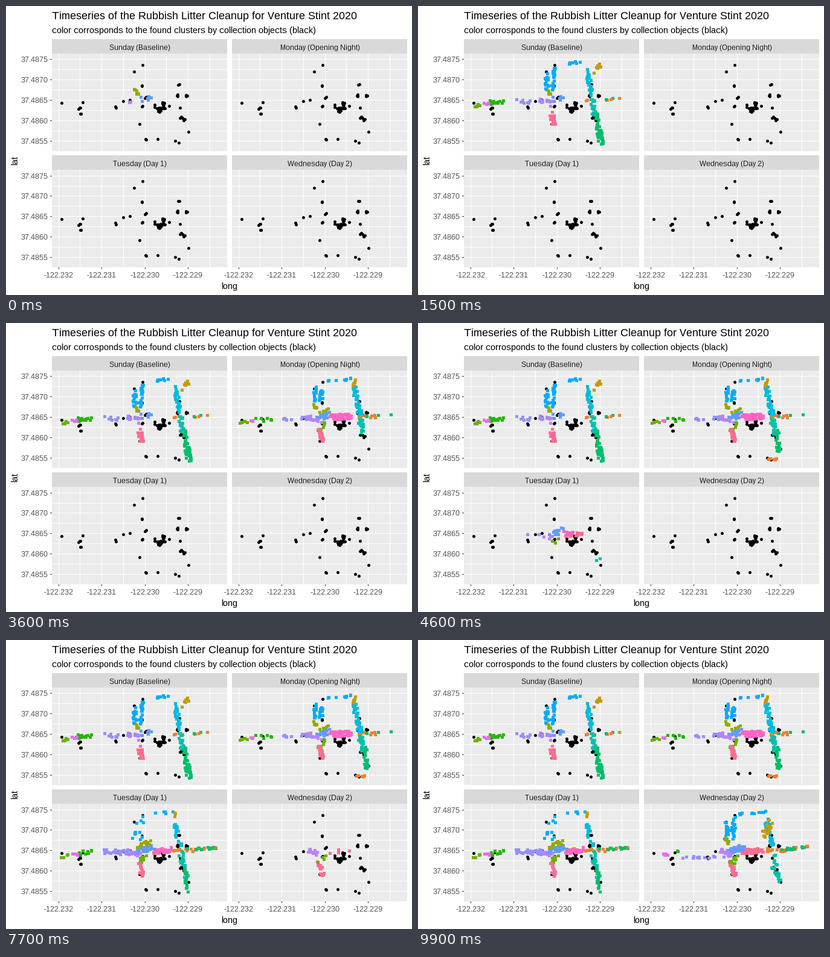
These frames come from a looping animation (672x480 px, 10 s). A matplotlib script:

```python
import numpy as np
import matplotlib.pyplot as plt
from matplotlib.animation import FuncAnimation
from matplotlib.patches import Rectangle

W, H, DPI = 672, 480, 96
FRAMES, STEP_MS = 100, 100
DX, DY = 298, 193.22  # distance between facets
PT = 72 / DPI

rng = np.random.default_rng(7)
# Whole-pixel glyph advances without kerning
plt.rcParams.update({"font.family": "Liberation Sans", "text.hinting": "native",
                     "text.hinting_factor": 1, "text.kerning_factor": 6})

fig = plt.figure(figsize=(W / DPI, H / DPI), dpi=DPI, facecolor="white")
ax = fig.add_axes([0, 0, 1, 1])
ax.set(xlim=(0, W), ylim=(H, 0))
ax.axis("off")


def box(x, y, w, h, color):
    ax.add_patch(Rectangle((x, y), w, h, fc=color, lw=0, aa=False))


def label(x, y, s, px, color="black", ha="center", **kw):
    ax.text(x, y, s, fontsize=px * PT, color=color, ha=ha, va="baseline", **kw)


def dots(xy, color):
    xy = np.rint(xy) + 0.5
    return ax.scatter(xy[:, 0], xy[:, 1], s=(5 * PT) ** 2, c=color,
                      linewidths=0, antialiaseds=False, zorder=5)


def tick_x(i):
    return int(87 + 71.5 * i)


def tick_y(i, oy):
    return int(88.4 + 33.8 * i + oy + 0.5)


# Facets
DAYS = ["Sunday (Baseline)", "Monday (Opening Night)",
        "Tuesday (Day 1)", "Wednesday (Day 2)"]
ORIGINS = [(0, 0), (DX, 0), (0, DY), (DX, DY)]

for day, (ox, oy) in zip(DAYS, ORIGINS):
    top = int(oy)
    box(76 + ox, 55 + top, 290, 24, "#D9D9D9")
    box(76 + ox, 79 + top, 290, 162, "#EBEBEB")
    for i in np.arange(0, 4, 0.5):
        box(tick_x(i) + ox, 79 + top, 1, 162, "white")
    for i in np.arange(0, 4.5, 0.5):
        box(76 + ox, tick_y(i, oy), 290, 1, "white")
    label(221.5 + ox, 73 + top, day, 12, "#1A1A1A")

for oy in (0, DY):
    for i in range(5):
        y = tick_y(i, oy)
        box(73, y, 3, 1, "#333333")
        label(70, y + 5, f"{37.4875 - i * 0.0005:.4f}", 12, "#4D4D4D", "right")
for ox in (0, DX):
    for i in range(4):
        x = tick_x(i) + ox
        box(x, 434, 1, 3, "#333333")
        label(x, 451, f"-{122.232 - i * 0.001:.3f}", 12, "#4D4D4D")

label(76.5, 22, "Timeseries of the Rubbish Litter Cleanup for Venture Stint 2020",
      18, ha="left")
label(76, 45, "color corrosponds to the found clusters by collection objects (black)",
      15, ha="left")
label(369.5, 470, "long", 15)
label(19, 257, "lat", 15, rotation=90, rotation_mode="anchor")

# Collection objects, the same in every facet: x, y, how many stand there
OBJECTS = [(91, 160, 1), (126, 159, 1), (121, 168, 3), (123, 178, 3), (180, 166, 2),
           (193, 157, 1), (204, 155, 1), (211, 108, 1), (225, 97, 1), (224, 132, 2),
           (224, 166, 2), (229, 152, 2), (220, 195, 1), (230, 220, 2), (250, 220, 1),
           (279, 223, 1), (285, 226, 1), (301, 208, 1), (284, 130, 2), (282, 148, 3),
           (297, 149, 3), (287, 168, 1), (289, 183, 3), (295, 187, 2)]
objects = [(x, y) + rng.uniform(-2.5, 2.5, 2) * (k > 0)
           for x, y, n in OBJECTS for k in range(n)]
plaza = rng.normal((256, 169), (6, 5), (24, 2)).clip((245, 159), (273, 180))
for origin in ORIGINS:
    dots(np.vstack([objects, plaza]) + origin, "black")

# Clusters: color, spread, and the two ends of the stretch of street
PINK, ORANGE, GOLD, OLIVE = "#FF6C91", "#EA8331", "#C49A00", "#99A800"
LIME, GREEN, JADE, TEAL = "#6BB100", "#24B700", "#00BE6B", "#00C1AB"
CYAN, SKY, BLUE, IRIS = "#00BBDA", "#00ACFC", "#619CFF", "#9590FF"
PURPLE, VIOLET, MAGENTA = "#B983FF", "#E76BF3", "#FF65C5"

ZONES = {
    "west end": (LIME, 2, (104, 163), (89, 167)),
    "west mid": (VIOLET, 1.5, (118, 163), (108, 162)),
    "west": (GREEN, 4, (143, 159), (119, 161)),
    "mid": (IRIS, 4, (212, 160), (160, 158)),
    "mid low": (IRIS, 2, (208, 166), (135, 169)),
    "corner": (PURPLE, 4, (202, 156), (222, 163)),
    "cross": (BLUE, 4.5, (218, 157), (241, 151)),
    "olive": (OLIVE, 2, (210, 134), (217, 147)),
    "olive east": (OLIVE, 4, (216, 148), (239, 143)),
    "lime": (LIME, 3.5, (229, 166), (220, 178)),
    "pink": (PINK, 3, (219, 176), (226, 198)),
    "alley west": (SKY, 3, (212, 136), (213, 107)),
    "alley east": (SKY, 3, (222, 142), (225, 100)),
    "top": (SKY, 2, (232, 96), (280, 92)),
    "gold": (GOLD, 2, (280, 91), (277, 104)),
    "gold east": (GOLD, 3, (303, 94), (291, 109)),
    "gold south": (GOLD, 4, (290, 100), (272, 136)),
    "plaza": (MAGENTA, 4.5, (242, 156), (272, 155)),
    "plaza pink": (PINK, 4, (240, 158), (271, 156)),
    "east": (CYAN, 3.5, (288, 152), (278, 105)),
    "east mid": (TEAL, 4, (288, 157), (293, 184)),
    "orange": (ORANGE, 2.5, (275, 155), (317, 155)),
    "far": (ORANGE, 2, (318, 154), (347, 150)),
    "far green": (JADE, 2, (300, 154), (349, 151)),
    "south": (JADE, 3, (296, 180), (299, 222)),
    "south end": (JADE, 3, (300, 206), (304, 232)),
    "south bend": (TEAL, 3, (288, 182), (305, 212)),
    "foot": (ORANGE, 2, (281, 225), (296, 227)),
}

# Each day's walk: first frame, last frame, then the finds per cluster
WALKS = [
    (0, 15, [
        ("olive", 7), ("cross", 7), ("corner", 9), ("mid", 9), ("west", 14),
        ("west mid", 5), ("west end", 5), ("pink", 18), ("alley west", 14),
        ("alley east", 20), ("top", 7), ("gold east", 9), ("east", 26),
        ("orange", 6), ("east mid", 22), ("far green", 2), ("far", 2),
        ("south", 22), ("south end", 24)]),
    (16, 40, [
        ("cross", 24), ("corner", 6), ("plaza", 55), ("orange", 10), ("lime", 10),
        ("pink", 20), ("east", 34), ("gold", 5), ("top", 8), ("alley east", 14),
        ("alley west", 14), ("olive", 5), ("olive east", 4), ("mid", 13),
        ("corner", 8), ("west", 6), ("west mid", 3), ("west end", 5),
        ("far green", 3), ("east mid", 24), ("south", 24), ("foot", 9)]),
    (41, 75, [
        ("cross", 13), ("corner", 5), ("mid", 2), ("lime", 3), ("plaza pink", 20),
        ("south bend", 2), ("plaza", 20), ("corner", 10), ("mid", 28), ("west", 9),
        ("west mid", 4), ("west end", 4), ("far green", 4), ("cross", 22),
        ("olive east", 16), ("alley east", 6), ("alley west", 6), ("top", 5),
        ("gold", 3), ("east", 20), ("orange", 12), ("far", 8), ("far green", 8),
        ("lime", 10), ("pink", 20), ("east mid", 18), ("south", 16)]),
    (75, 99, [
        ("pink", 17), ("lime", 4), ("plaza pink", 4), ("corner", 24),
        ("mid low", 14), ("west mid", 4), ("west", 2), ("lime", 8), ("pink", 8),
        ("alley west", 18), ("alley east", 16), ("top", 12), ("east mid", 8),
        ("south bend", 18), ("plaza pink", 40), ("cross", 30), ("olive", 8),
        ("east", 38), ("gold south", 16), ("orange", 12), ("far", 10),
        ("far green", 16)]),
]

times, spots, colors = [], [], []
for (start, end, walk), origin in zip(WALKS, ORIGINS):
    total = sum(n for _, n in walk)
    times.extend(np.linspace(start, end, total).astype(int))
    for zone, n in walk:
        color, spread, a, b = ZONES[zone]
        u = np.sort(rng.random((n, 1)), axis=0)
        jitter = rng.uniform(-spread, spread, (n, 2))
        spots.append(np.array(a) * (1 - u) + np.array(b) * u + jitter + origin)
        colors += [color] * n

order = np.argsort(times, kind="stable")
times = np.array(times)[order]
spots = np.rint(np.vstack(spots)[order]) + 0.5
colors = np.array(colors)[order]
litter = dots(spots, colors)


def draw(i):
    shown = np.searchsorted(times, i, side="right")
    litter.set_offsets(spots[:shown])
    litter.set_facecolors(colors[:shown])
    return litter,


anim = FuncAnimation(fig, draw, frames=FRAMES, interval=STEP_MS, repeat=True,
                     repeat_delay=0, blit=False)
plt.show()
```
